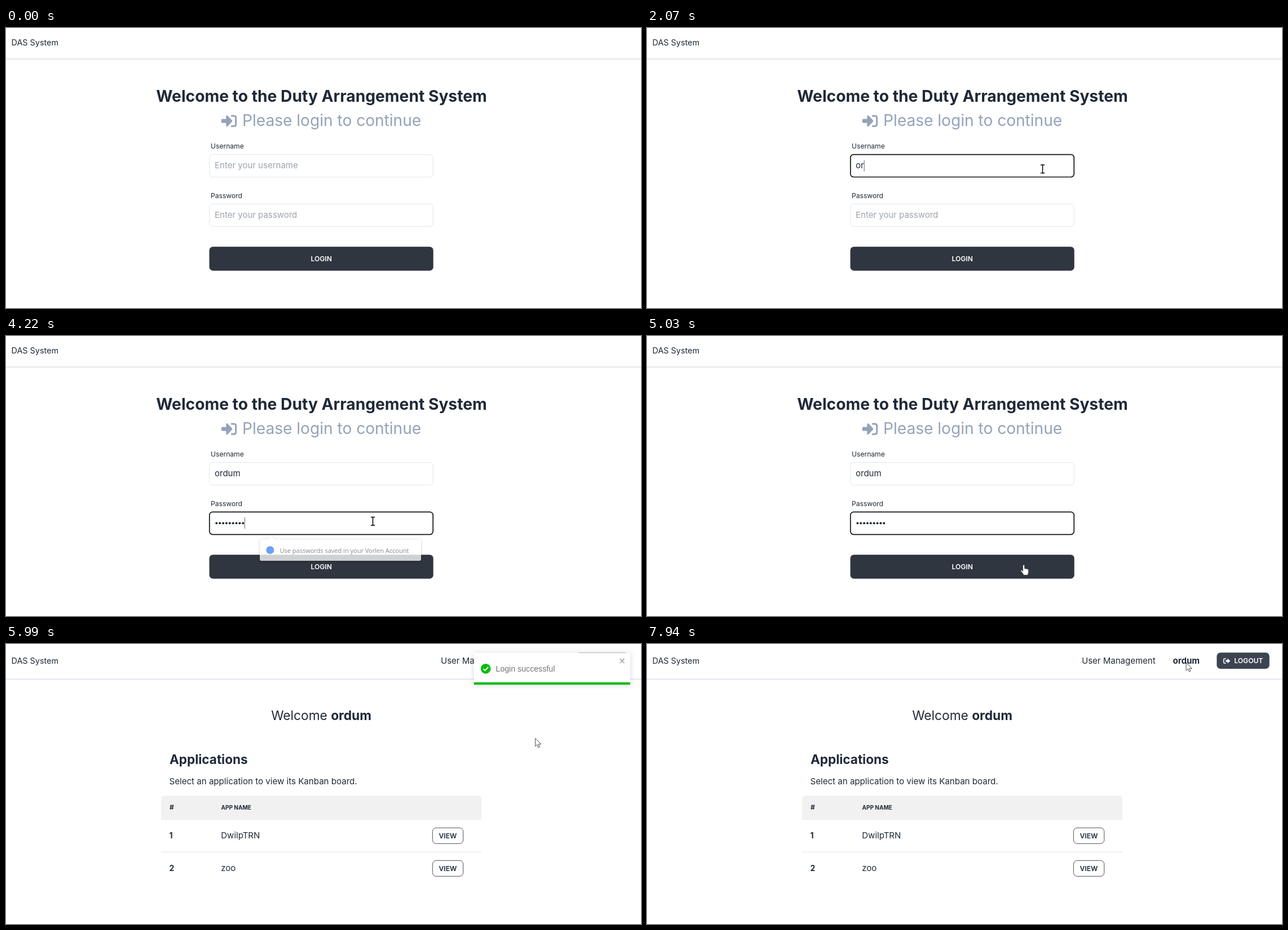
An HTML page that plays this animation: 1126x497 px, repeating every 8000 ms.

```html
<!DOCTYPE html>
<html lang="en">
<head>
<meta charset="utf-8">
<title>Login demo</title>
<style>
  html, body { margin: 0; width: 100%; height: 100%; overflow: hidden; background: #fff; }
  svg { display: block; width: 100vw; height: 100vh; }
  text { font: 400 15px Inter, sans-serif; fill: #1f2937; white-space: pre; }
  .bold { font-weight: 700; }
  .semi { font-weight: 600; }
  .mid { text-anchor: middle; }
  .brand { font-size: 14.4px; }
  .label { font-size: 12.1px; }
  .hint { fill: #9ca3af; }
  .white { fill: #fff; }
  .btn { font-size: 12.1px; }
  .field { fill: #fff; stroke: #e5e6e9; }
  .field.focus { stroke: #111318; stroke-width: 1.7; }
  .caret { fill: #5b6470; }
  .outline { fill: none; stroke: #4a515d; }
  #toast rect.card { filter: drop-shadow(0 1px 5px rgba(0, 0, 0, .16)); }
</style>
</head>
<body>
<svg viewBox="0 0 1126 497">
  <g id="login">
    <text class="brand" x="9.5" y="31">DAS System</text>
    <rect y="54.2" width="1126" height="1.8" fill="#e2e4e8"/>
    <text class="bold mid" x="559.5" y="131" style="font-size:28.2px">Welcome to the Duty Arrangement System</text>
    <g fill="#94a3b8">
      <path d="M383.5 161.5h6.8v-4.7q0-3 2.6-1.2l7.8 8.1q1.2 1.3 0 2.6l-7.8 8.1q-2.6 1.8-2.6-1.2v-4.7h-6.8q-1.7 0-1.7-1.7v-3.6q0-1.7 1.7-1.7z"/>
      <path d="M400.2 155.9h3.8q3.6 0 3.6 3.6v11.2q0 3.6-3.6 3.6h-3.8" fill="none" stroke="#94a3b8" stroke-width="3" stroke-linecap="round"/>
    </g>
    <text x="419" y="173.5" style="font-size:28.1px;fill:#94a3b8">Please login to continue</text>

    <text class="label" x="363" y="214">Username</text>
    <rect id="userField" class="field" x="360.8" y="224.6" width="396.4" height="39.9" rx="5.5"/>
    <text id="userText" x="370" y="249.3"></text>
    <rect id="userCaret" class="caret" y="235" width="1" height="19.5"/>

    <text class="label" x="363" y="302">Password</text>
    <rect id="passField" class="field" x="360.8" y="312.4" width="396.4" height="39.9" rx="5.5"/>
    <text id="passHint" class="hint" x="370" y="337.3">Enter your password</text>
    <g id="dots" fill="#1f2937"></g>
    <rect id="passCaret" class="caret" y="322" width="1" height="20"/>

    <rect x="360.5" y="388.2" width="397.2" height="42.5" rx="6.5" fill="#2f3640"/>
    <text class="semi mid white" x="559.2" y="414" style="font-size:12.1px">LOGIN</text>

    <g id="popup">
      <path d="M453 361H464L470.5 355L477 361H733q3 0 3 3V396q0 3-3 3H453q-3 0-3-3V364q0-3 3-3z" fill="#fff" style="filter:drop-shadow(0 1px 2px rgba(0,0,0,.3))"/>
      <circle cx="468.3" cy="380" r="7" fill="#4285f4"/>
      <text x="485.5" y="384.6" style="font:11px 'Open Sans',sans-serif;fill:#5f6368">Use passwords saved in your Vorlen Account</text>
    </g>
  </g>

  <g id="home">
    <text class="brand" x="9.5" y="34.5">DAS System</text>
    <rect y="61.8" width="1126" height="1.6" fill="#dde1f0"/>
    <text x="771" y="34.5">User Management</text>
    <text class="bold" x="932.5" y="34.5">ordum</text>
    <rect x="1010.3" y="15.3" width="93.4" height="28.7" rx="6.5" fill="#3d4451"/>
    <path d="M1026 26h-1.8q-1.6 0-1.6 1.6v4.8q0 1.6 1.6 1.6h1.8" fill="none" stroke="#fff" stroke-width="1.5" stroke-linecap="round"/>
    <path d="M1026 28.4h3.3v-2.9l5 4.5-5 4.5v-2.9h-3.3z" fill="#fff"/>
    <text class="semi white btn" x="1041.3" y="34.2">LOGOUT</text>

    <text class="mid" x="559" y="134.5" style="font-size:22.7px">Welcome <tspan class="bold">ordum</tspan></text>
    <text class="bold" x="290" y="212.5" style="font-size:22.5px">Applications</text>
    <text x="289.5" y="249.3" style="font-size:15.1px">Select an application to view its Kanban board.</text>
    <path d="M275 312V276q0-7 7-7H836q7 0 7 7V312z" fill="#f1f1f1"/>
    <text class="bold" x="290" y="294" style="font-size:12px">#</text>
    <text class="bold" x="381.5" y="294" style="font-size:10px">APP NAME</text>
    <rect x="275" y="368.6" width="568" height="1.2" fill="#ececee"/>
    <g id="rows"></g>
  </g>

  <g id="toast">
    <rect class="card" x="832" y="15.5" width="277" height="56.5" rx="3" fill="#fff"/>
    <circle cx="853" cy="43.8" r="8.9" fill="#07bc0c"/>
    <path d="M848.7 44.2l3.1 3 5.6-6.4" fill="none" stroke="#fff" stroke-width="1.9"/>
    <text x="870.7" y="48.9" style="font:14.2px 'Liberation Sans',Arial,sans-serif;fill:#757575">Login successful</text>
    <path d="M1091 26.2l7.6 7.6m0-7.6l-7.6 7.6" stroke="#aaa" stroke-width="1.8"/>
    <rect id="progress" x="832" y="68" height="4.2" fill="#07bc0c"/>
  </g>

  <g id="pointer">
    <path id="arrow" d="M0 0V14.2L3.3 11.2 5.5 16.2 7.7 15.2 5.5 10.4H10.2z" fill="#fff" stroke="#33363d" stroke-width=".9"/>
    <path id="beam" d="M-3.6-7.3H3.6M0-7.3V7.3M-3.6 7.3H3.6" fill="none" stroke="#000" stroke-width="1.5"/>
    <path id="hand" d="M-1.6 11.5V1.6a1.6 1.6 0 0 1 3.2 0V7q1.2-1 2.6.3 1.2-.8 2.4.5 1.9-.4 2.1 1.6V13q0 2-1.3 3.5V18.5H-.6V17L-4.8 11.5q-1-1.8.6-2.2 1 0 2.6 2.2z" fill="#fff" stroke="#33363d" stroke-width=".9"/>
  </g>
</svg>
<script>
const LOOP = 8000, USER = 'ordum', HOME_AT = 5345;
const USER_KEYS = [1940, 2070, 2190, 2270, 2400];
const PASS_KEYS = [[3950, 2], [4080, 6], [4220, 9]];
// Pointer path: time, x, y
const PATH = [
  [120, 1112, 499], [870, 736, 260], [940, 701.5, 250.3], [2930, 701.5, 250.3],
  [3350, 651.5, 327], [3950, 651.5, 327], [4080, 650.5, 328.7], [4220, 650.5, 328.7],
  [4960, 668, 406], [5570, 668, 406], [5780, 866, 234], [6300, 1045, 70],
  [6480, 1094, 34.5], [7420, 1094, 34.5], [7680, 1030, 41], [7940, 956, 33]
];

const $ = id => document.getElementById(id);
const show = (id, on) => $(id).style.display = on ? '' : 'none';
const ramp = (t, from, to) => Math.min(1, Math.max(0, (t - from) / (to - from)));
const within = (v, from, to) => v >= from && v < to;

$('rows').innerHTML = ['DwilpTRN', 'zoo'].map((name, i) => `
  <g transform="translate(0 ${i * 58})">
    <text class="bold" x="289.5" y="345.2" style="font-size:14px">${i + 1}</text>
    <text x="381.3" y="345.2">${name}</text>
    <rect class="outline" x="756.3" y="326.3" width="54.4" height="28" rx="6.5"/>
    <text class="semi mid btn" x="783.4" y="344.8">VIEW</text>
  </g>`).join('');
$('dots').innerHTML = Array.from({ length: 9 }, (_, i) =>
  `<circle cx="${373.3 + i * 5.87}" cy="332.3" r="2"/>`).join('');

function pointerAt(t) {
  const i = PATH.findIndex(p => p[0] > t);
  if (i < 0) return PATH[PATH.length - 1].slice(1);
  if (i === 0) return PATH[0].slice(1);
  const a = PATH[i - 1], b = PATH[i], k = ramp(t, a[0], b[0]);
  return [a[1] + (b[1] - a[1]) * k, a[2] + (b[2] - a[2]) * k];
}

function pointerKind(t, x, y) {
  if (t >= HOME_AT) return y < 72 && x > 1010 ? 'hand' : 'arrow';
  if (!within(x, 360, 736)) return 'arrow';
  if (within(y, 224, 265) || within(y, 312, 353)) return 'beam';
  return within(y, 388, 431) ? 'hand' : 'arrow';
}

// Bounces in from the right, later recoils and flies out
function toastShift(t) {
  if (t >= 7000) {
    if (t < 7140) return -20 * ramp(t, 7000, 7140);
    return -20 + 2020 * (1 - (1 - ramp(t, 7140, 7700)) ** 2.2);
  }
  const p = (t - HOME_AT) / 700;
  const stops = [[0, 3000], [.6, -25], [.75, 10], [.9, -5], [1, 0]];
  const i = stops.findIndex(s => s[0] > p);
  if (i < 1) return 0;
  const [p0, x0] = stops[i - 1], [p1, x1] = stops[i];
  return x0 + (x1 - x0) * (1 - (1 - ramp(p, p0, p1)) ** 3);
}

function drawLogin(t) {
  const typed = USER_KEYS.filter(k => t >= k).length;
  const dots = PASS_KEYS.reduce((n, [k, count]) => t >= k ? count : n, 0);
  const user = $('userText');
  user.textContent = typed ? USER.slice(0, typed) : 'Enter your username';
  user.classList.toggle('hint', !typed);
  $('userField').classList.toggle('focus', within(t, 1080, 3420));
  $('passField').classList.toggle('focus', t >= 3420);

  show('userCaret', within(t, 1080, 1610) || within(t, 1940, 2930));
  $('userCaret').setAttribute('x', typed ? 370 + user.getComputedTextLength() : 370);
  show('passCaret', within(t, 3420, 4750));
  $('passCaret').setAttribute('x', dots ? 370 + dots * 5.87 : 370);

  show('passHint', !dots);
  [...$('dots').children].forEach((dot, i) => dot.style.display = i < dots ? '' : 'none');
  $('popup').style.opacity = ramp(t, 3400, 3620) * (1 - ramp(t, 4160, 4430));
}

function draw(t) {
  const home = t >= HOME_AT;
  show('login', !home);
  show('home', home);
  show('toast', home);
  if (home) {
    $('toast').setAttribute('transform', `translate(${toastShift(t)} 0)`);
    $('toast').style.opacity = t < 7140 ? 1 : (1 - ramp(t, 7140, 7700)) ** 2.2;
    $('progress').setAttribute('width', 277 - 14 * ramp(t, 6045, 6300));
  } else {
    drawLogin(t);
  }
  const [x, y] = pointerAt(t), kind = pointerKind(t, x, y);
  show('pointer', t >= 120);
  $('pointer').setAttribute('transform', `translate(${x} ${y})`);
  for (const k of ['arrow', 'beam', 'hand']) show(k, k === kind);
}

const start = performance.now();
function tick() {
  draw((performance.now() - start) % LOOP);
  requestAnimationFrame(tick);
}
tick();
</script>
</body>
</html>
```
